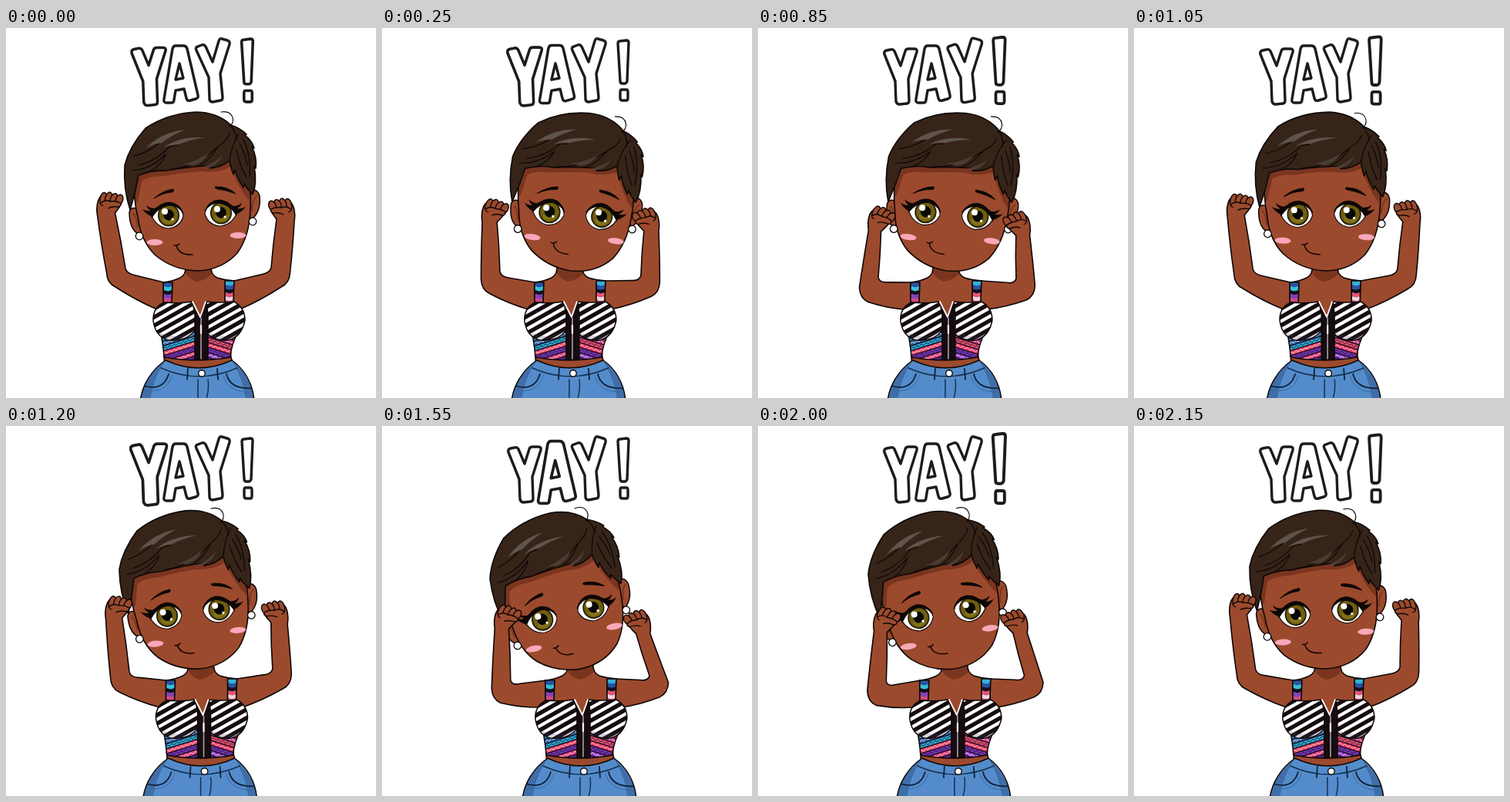
An HTML page with a canvas that plays this animation: 480 px wide and 480 px high, repeating every 2200 ms.

```html
<!DOCTYPE html>
<html lang="en">
<head>
<meta charset="utf-8">
<title>YAY!</title>
<style>
html, body { margin: 0; width: 100%; height: 100%; overflow: hidden; background: #fff; }
canvas { display: block; width: 480px; height: 480px; }
</style>
</head>
<body>
<canvas id="stage" width="480" height="480" role="img" aria-label="YAY!"></canvas>
<script>
const ctx = document.getElementById('stage').getContext('2d');
const LOOP = 2200, HALF = 1100, STEP = 50;
const INK = '#0d0706', SKIN = '#9c4a2d', SHADE = '#7a351f', HAIR = '#362419', JEANS = '#548ccb';

// ---- drawing helpers ----
function shape(d, fill, stroke, width = 1.5) {
  const p = typeof d === 'string' ? new Path2D(d) : d;
  if (fill) { ctx.fillStyle = fill; ctx.fill(p); }
  if (stroke) { ctx.strokeStyle = stroke; ctx.lineWidth = width; ctx.stroke(p); }
}
function oval(x, y, rx, ry, fill, stroke, width, turn = 0) {
  const p = new Path2D();
  p.ellipse(x, y, rx, ry, turn, 0, 7);
  shape(p, fill, stroke, width);
}
function group(draw) { ctx.save(); draw(); ctx.restore(); }
function inside(d, draw) {
  group(() => { ctx.clip(new Path2D(d)); draw(); });
}
function turnAt(x, y, angle, scale = 1) {
  ctx.translate(x, y);
  ctx.rotate(angle);
  ctx.scale(scale, scale);
  ctx.translate(-x, -y);
}

// ---- motion ----
const POWER = 3;
function sway(t) {
  const n = Math.floor(t / 550), q = (t % 550) / 550;
  const v = n % 2 ? 1 - q ** POWER : 1 - (1 - q) ** POWER;
  return n < 2 ? v : -v;
}
const TIMES = [0, 50, 100, 275, 475, 700, 850, 950, 1050, 1100];
const RAISE_L = [1, 0.97, 0.74, 0.42, 0.3, 0.2, 0.02, 0.32, 0.86, 1];
const RAISE_R = [1, 0.98, 0.78, 0.42, 0.3, 0.2, 0.26, 0.45, 0.88, 1];
function keyed(vals, t) {
  const last = TIMES.length - 1;
  let i = 0;
  while (i < last - 1 && t >= TIMES[i + 1]) i++;
  const slope = k => k === 0 || k === last ? 0
    : (vals[k + 1] - vals[k - 1]) / (TIMES[k + 1] - TIMES[k - 1]);
  const span = TIMES[i + 1] - TIMES[i], q = (t - TIMES[i]) / span, r = 1 - q;
  return r * r * (1 + 2 * q) * vals[i] + q * q * (3 - 2 * q) * vals[i + 1]
    + span * q * r * (r * slope(i) - q * slope(i + 1));
}

// ---- lettering ----
const LETTERS = [
  { x: 184, y: 63, peak: 130, grow: 0.11,
    d: 'M167 29Q163 30 164 34L178 69L179 95Q180 99 184 99L193 98Q196 98 196 94L195 66L206 31Q207 27 203 27L195 27Q192 27 191 30L185 49L177 30Q175 27 172 28Z' },
  { x: 228, y: 60, peak: 410, grow: 0.1,
    d: 'M220 23Q217 23 216 27L205 92Q204 97 208 97L215 97Q218 97 218 93L220 81L231 79L234 91Q235 95 239 94L246 92Q250 91 249 87L235 27Q234 23 230 23ZM225 46L230 65L220 67Z' },
  { x: 267, y: 55, peak: 690, grow: 0.11,
    d: 'M249 24Q245 25 247 29L263 64L264 92Q264 96 268 96L278 94Q281 94 281 90L278 59L290 21Q291 17 287 16L280 14Q277 13 276 17L268 44L259 24Q257 21 254 22Z' },
  { x: 314, y: 55, peak: 955, grow: 0.18,
    d: 'M309 17Q306 17 306 20L309 69Q309 72 312 72L315 72Q317 72 318 69L320 19Q320 16 317 16ZM311 80Q309 80 309 83L309 91Q309 94 312 94L317 94Q319 94 319 91L319 83Q319 80 317 80Z' }
];
function drawLetters(t) {
  for (const l of LETTERS) {
    const gap = Math.abs(t - l.peak), away = Math.min(gap, HALF - gap);
    const lift = away < 175 ? Math.cos(away / 175 * Math.PI / 2) : 0;
    group(() => {
      turnAt(l.x, l.y, 0, 1 + l.grow * lift);
      shape(l.d, '#fff', '#1c1c1c', 3.4);
    });
  }
}

// ---- body ----
function drawTorso() {
  shape('M233 306Q234 320 226 324Q216 329 203 330L192 362L206 400L204 438L293 438L292 400L306 362L297 328Q283 327 274 324Q265 320 266 306Z', SKIN);
  shape('M233 311Q250 319 266 311L267 319Q258 328 247 329Q238 326 233 318Z', SHADE);
  shape('M233 308Q234 320 226 324Q216 329 203 330M266 308Q265 320 274 324Q283 327 297 328', null, INK);
}

const HIPS = 'M207 431Q250 451 293 431C309 442 321 462 322 485L174 485C176 464 189 443 207 431Z';
function drawJeans() {
  shape('M205 424L206 434Q250 454 294 434L291 424Z', SKIN, INK);
  shape(HIPS, JEANS);
  inside(HIPS, () => {
    shape('M170 485Q178 455 207 431Q190 456 187 485ZM326 485Q316 452 293 431Q309 458 311 485Z', '#3f6ea8');
    shape('M201 441Q250 463 300 441M262 456Q264 470 259 484M249 456L249 484', null, '#15304f', 1.5);
    shape('M178 464Q204 472 211 449M322 467Q291 470 286 449M236 442L235 456M274 442L275 456', null, '#0f2238', 1.8);
    shape('M180 469Q208 476 215 451M318 472Q288 474 282 451', null, '#3a69a5', 1);
  });
  shape(HIPS, null, INK);
  oval(254, 448, 4.3, 4.3, '#fff', INK, 1.4);
}

const COOL = ['#2aaecf', '#2268ad', '#2aaecf', '#eb4565', '#7a35b5', '#d93d74', '#5a2c9c', '#2aaecf'];
const WARM = ['#eb4565', '#c93a86', '#f0526a', '#e7365f', '#7a35b5', '#8a3fc5', '#7a35b5', '#c93a86'];
function weave(x, y, w, slope, dyes) {
  dyes.forEach((dye, r) => {
    const z = new Path2D(), top = y + r * 6.5;
    for (let k = 0; k * 3 <= w; k++) {
      z.lineTo(x + k * 3, top + slope * k * 3 / w + (k % 2 ? 1.3 : -1.3));
    }
    shape(`M${x} ${top}L${x + w} ${top + slope}`, null, dye, 4.8);
    shape(z, null, r % 2 ? '#ffd9e6' : '#1b1740', 0.9);
  });
}

const BUST_L = 'M191 380Q190 363 205 356Q226 358 241 355L247 365L247 389Q237 407 211 405Q194 401 191 380Z';
const BUST_R = 'M310 379Q310 363 296 355Q276 357 259 355L256 366L256 390Q266 407 289 405Q306 400 310 379Z';
function drawBust(d, x) {
  shape(d, '#fff');
  inside(d, () => {
    for (let k = -4; k < 7; k++) {
      const y = 360 + k * 11;
      shape(`M${x - 32} ${y + 18}L${x + 32} ${y - 18}`, null, '#160c10', 5.4);
    }
    shape(`M${x - 32} 387Q${x} 412 ${x + 32} 387L${x + 32} 410L${x - 32} 410Z`, 'rgba(70,60,90,.22)');
  });
  shape(d, null, INK);
}

function drawStrap(x, y, tones) {
  const d = `M${x} ${y}L${x + 12} ${y}L${x + 11} 356L${x} 356Z`;
  shape(d, '#2b9fd0');
  inside(d, () => {
    tones.forEach((c, k) => shape(`M${x - 1} ${y + 2 + k * 5}l7 2l7 -2`, null, c, 4.5));
  });
  shape(d, null, INK, 1.7);
}

function drawTop() {
  drawStrap(204, 330, ['#2a50a4', '#35c0d8', '#170d1c', '#8b3eb6', '#d9457f', '#36a5d8']);
  drawStrap(284, 328, ['#35b0d8', '#2a50a4', '#170d1c', '#f0506c', '#f6d3dc', '#eb4565']);
  const base = 'M200 392Q204 411 205 427Q248 435 291 427Q292 411 302 392Z';
  shape(base, '#1b1028');
  inside(base, () => {
    weave(200, 404, 48, -15, COOL);
    weave(254, 389, 48, 15, WARM);
  });
  shape(base, null, INK);
  drawBust(BUST_L, 219);
  drawBust(BUST_R, 283);
  shape('M242 356L250 372L260 355L262 371L262 430L245 430L245 371Z', '#160c10', INK, 1.5);
  shape('M243 356L252 374L259 356L250 359Z', SKIN);
  shape('M242 355L252 375L259 355', null, '#fff', 1.8);
  shape('M253 376L253 429', null, '#a8a0aa', 1.6);
  shape('M253 386L253 396', null, '#f3eef3', 2.3);
}

// ---- arms: m is 1 for the left side, -1 for the right ----
function drawArm(m, dx, hand, elbow, u) {
  const at = (o, x, y) => [o[0] + x * m, o[1] + y];
  const mid = (a, b, x) => [(a[0] + b[0]) / 2 + x * m, (a[1] + b[1]) / 2];
  const left = m > 0;
  const pit = [(left ? 196 : 303) + dx, 365], top = [(left ? 205 : 296) + dx, left ? 330 : 328];
  const w1 = at(hand, -16, 16), w2 = at(hand, 7 * u, 18 - 5 * u);
  const crook = at(elbow, 25, left ? -12 + 8 * u : -9 + 4 * u);
  const low = at(elbow, 11, 14), fold = at(crook, -1, -6);
  const turn = [crook[0] + (top[0] - crook[0]) * 0.25, crook[1] + (top[1] - crook[1]) * 0.25];
  const p = new Path2D();
  p.moveTo(...pit);
  p.quadraticCurveTo(...at(mid(pit, low, 0), 0, 3), ...low);
  p.quadraticCurveTo(...at(elbow, 0, 9), ...at(elbow, -0.5, -5));
  p.quadraticCurveTo(...mid(elbow, w1, -1), ...w1);
  p.bezierCurveTo(...at(hand, -18, 4), ...at(hand, -15, -10), ...at(hand, -8, -10));
  p.lineTo(...at(hand, 12, -7));
  p.bezierCurveTo(...at(hand, 18, 3), ...at(hand, 10, 8), ...w2);
  p.quadraticCurveTo(...mid(w2, fold, 1), ...fold);
  p.quadraticCurveTo(...at(crook, 1, 1), ...turn);
  p.lineTo(...top);
  shape(p, SKIN, INK, 1.6);
  group(() => {
    ctx.translate(...hand);
    ctx.scale(m, 1);
    ctx.rotate((1 - u) * 0.3);
    for (let k = 0; k < 4; k++) {
      oval(-8 + k * 6.8, -6 + Math.abs(k - 1), 4.6, 8.6 - k * 0.5, SKIN, INK, 1.4, 0.15 + k * 0.08);
    }
    shape('M-12 1Q-7 -5 1 -2Q9 -3 14 0Q16 4 11 5Q3 4 -2 7', SKIN, INK, 1.4);
  });
}

// ---- head ----
function drawEye(x, y, m) {
  const ball = 'M-21 1Q-15 -14 1 -16Q17 -14 20 1Q16 15 1 17Q-14 16 -21 1Z';
  group(() => {
    ctx.translate(x, y);
    ctx.scale(m, 1);
    shape(ball, '#fff', INK, 1.1);
    inside(ball, () => {
      oval(m, 0, 13.2, 13.6, '#6f5e10', '#241c05', 1.8);
      oval(m, 6, 8, 5, '#83721a');
      oval(m, -0.5, 6.8, 7.2, '#090806');
      oval(-4 * m, -5, 4, 4, '#fff');
      oval(6 * m, 5, 1.6, 1.6, '#fff');
    });
    shape('M-21 3Q-15 -16 2 -17Q14 -16 20 -3Q13 -13 2 -13Q-13 -11 -21 3Z', INK, INK, 1.2);
    shape('M-20 2Q-28 -1 -33 -8Q-28 -5 -22 -6Q-27 -9 -28 -13Q-23 -9 -17 -9L-14 -11L-14 -6Z', INK);
  });
}

function drawHair() {
  shape('M161 236Q152 209 154 178Q160 154 181 130Q209 111 246 109Q274 109 292 126Q304 130 312 138L310 139Q320 147 322 156L319 154Q326 168 324 182L322 179Q326 202 320 216Q313 209 309 202L308 207Q301 197 297 184L295 190Q291 180 290 172Q279 181 264 182L269 178Q236 180 208 185Q190 184 172 191Q168 214 161 236Z', HAIR, INK, 1.6);
  shape('M290 171Q293 151 302 137M291 126Q299 135 299 145M308 145Q318 164 316 193M299 158Q304 181 312 194M303 150Q311 165 313 178', null, INK, 1.3);
  shape('M163 185Q187 184 207 164Q201 179 187 186M214 183Q246 181 275 154Q263 174 247 180M166 166Q190 160 206 142M275 154Q286 147 290 137M172 178Q196 172 212 154L222 152', null, INK, 1.2);
  const shine = '#5e544d';
  shape('M181 156Q202 135 232 132Q213 140 202 149Q192 150 181 156Z', shine);
  shape('M204 155Q226 140 258 142Q238 145 224 151Q216 151 204 155Z', shine);
  shape('M230 177Q250 172 264 161Q256 175 243 178ZM256 180Q270 176 281 165Q276 177 264 181Z', '#4c3d34');
  shape('M279 109Q291 107 294 116Q296 123 290 128', null, INK, 1.1);
}

function drawHead() {
  shape('M174 237Q163 229 160 239Q160 260 171 267L178 263ZM315 211Q326 207 329 218Q331 237 320 247L313 245Z', SKIN, INK);
  shape('M165 241Q170 245 171 258M325 218Q319 224 319 237', null, SHADE, 1.8);
  const face = 'M166 190Q165 222 171 245Q175 277 194 295Q217 314 248 315Q280 314 300 292Q316 270 317 235Q319 208 311 176Q276 145 208 160Z';
  shape(face, SKIN);
  inside(face, () => {
    shape('M160 190L292 162L303 190L317 210L316 225Q301 207 291 180Q275 189 253 186Q218 189 207 192Q184 192 176 199L171 226L160 236Z', SHADE);
  });
  shape(face, null, INK, 1.6);
  drawEye(210, 243, 1);
  drawEye(278, 240, -1);
  shape('M192 221Q203 211 217 209Q219 212 215 213Q203 214 192 221ZM272 206Q287 205 298 215Q285 210 275 209Q270 208 272 206Z', INK, INK, 1);
  oval(193, 278, 10.5, 4, '#f8a8b9');
  oval(301, 269, 10.5, 4, '#f8a8b9');
  shape('M218 282Q222 283 225 280M221 282Q224 295 242 294', null, INK, 1.5);
  drawHair();
  oval(173, 270, 4.8, 4.8, '#fff', INK, 1.3);
  oval(320, 251, 4.8, 4.8, '#fff', INK, 1.3);
}

// ---- frame ----
function draw(t) {
  const beat = t % HALF, s = sway(t);
  const l = keyed(RAISE_L, beat), r = keyed(RAISE_R, beat);
  const dx = -7.6 * s + 0.4 * s * s;
  ctx.fillStyle = '#fff';
  ctx.fillRect(0, 0, 480, 480);
  ctx.lineJoin = ctx.lineCap = 'round';
  drawLetters(beat);
  group(() => {
    ctx.translate(dx, 0);
    drawTorso();
    ctx.translate(3 * s * s, 0);
    turnAt(248, 320, (9.85 * s - s * s) * Math.PI / 180);
    drawHead();
  });
  drawArm(1, dx, [165.5 - 6.5 * s - 31 * l, 250 - 4 * s - 23 * l],
    [138 - 7 * s - 7 * l, 347 - 6 * s - 25 * l], l);
  drawArm(-1, dx, [325 + 3.5 * s + 33 * r, 260 - s - 25 * r],
    [363 - 6.5 * s + 5 * r, 345 - 23 * r], r);
  group(() => {
    ctx.translate(dx, 0);
    drawJeans();
    drawTop();
  });
}

const start = performance.now();
function tick() {
  const t = (performance.now() - start) % LOOP;
  draw(Math.floor(t / STEP) * STEP);
  requestAnimationFrame(tick);
}
tick();
</script>
</body>
</html>
```
